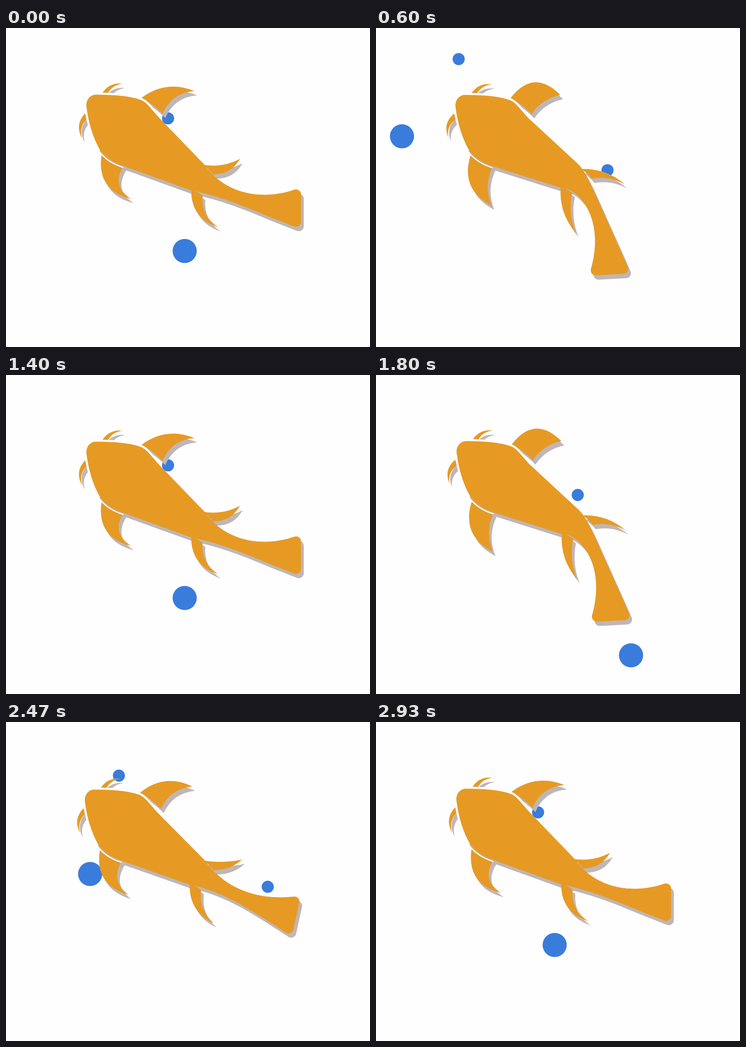
Animation, 799 px wide and 701 px high, one loop 2.99 s. Source, as an HTML page with a canvas:

```html
<!DOCTYPE html>
<html lang="en">
<head>
<meta charset="utf-8">
<title>Swimming fish</title>
<style>
  html, body { margin: 0; width: 100%; height: 100%; overflow: hidden; background: #fefefe; }
  canvas { display: block; }
</style>
</head>
<body>
<canvas id="stage" width="799" height="701"></canvas>
<script>
const ctx = document.getElementById('stage').getContext('2d');
const ORANGE = '#e69a24', SHADOW = '#bfb6b6', BLUE = '#397cdc', PAPER = '#fefefe';
const LOOP = 2990, FRAME = 200 / 3, CYCLE = 1500;

// Swim clock: time and phase, linear in between.
const CLOCK = [[0, 995], [600, 1695], [1800, 2895], [2467, 3500], [2930, 3995], [LOOP, 3995]];

const CHIN = 'M259 303Q224 292 207 268';
const HEAD = CHIN + 'Q184 228 177 172C176 158 184 147 197 146Q265 146 295 157C308 161 318 176 336 196';

// Each fin grows from a to b and sways between two tips.
// outer and inner give the bulge of its edges at either end of the sway.
const FRONT_FINS = [
  { a: [298, 153], b: [344, 188], tips: [[414, 138], [407, 146]], outer: [0.28, 0.57], inner: [0.3, 0.2] },
  { a: [210, 279], b: [259, 302], tips: [[275, 375], [256, 389]], outer: [-0.45, -0.42], inner: [-0.5, -0.22] },
  { a: [211, 144], b: [223, 145], tips: [[256, 122], [257, 123]], outer: [0.32, 0.32], inner: [0.27, 0.27] },
  { a: [174, 187], b: [177, 200], tips: [[168, 243], [161, 239]], outer: [-0.37, -0.37], inner: [-0.3, -0.3] }
];
const REAR_FINS = [
  { a: [432, 300], b: [455, 321], tips: [[514, 287], [549, 343]], outer: [-0.17, 0.2], inner: [-0.3, 0.18], slide: [21, 9] },
  { a: [407, 354], b: [432, 368], tips: [[466, 437], [441, 449]], outer: [-0.37, -0.21], inner: [-0.3, -0.15], slide: [1, -7] }
];

const mix = (a, b, k) => a + (b - a) * k;
const mid = (p, q) => [(p[0] + q[0]) / 2, (p[1] + q[1]) / 2];
const wave = (p, peak) => Math.cos(2 * Math.PI * (p - peak) / CYCLE);

// Control point for an edge that bulges sideways by a share of its length.
function bulge(p, q, size) {
  const [x, y] = mid(p, q);
  return [x + (q[1] - p[1]) * size, y - (q[0] - p[0]) * size];
}

function fin({ a, b, tips, outer, inner, slide = [0, 0] }, k) {
  const move = p => p.map((v, i) => v + slide[i] * k);
  const from = move(a), to = move(b);
  const tip = tips[0].map((v, i) => mix(v, tips[1][i], k));
  const path = new Path2D();
  path.moveTo(...from);
  path.quadraticCurveTo(...bulge(from, tip, mix(...outer, k)), ...tip);
  path.quadraticCurveTo(...bulge(to, tip, mix(...inner, k)), ...to);
  path.quadraticCurveTo(...bulge(to, from, -0.08), ...from);
  return path;
}

// The tail follows a bending spine; its width narrows at the waist and flares at the end.
function body(k, bend) {
  const path = new Path2D(HEAD), steps = 40, length = 241;
  const back = [], belly = [];
  let x = 420 + 8 * k, y = 328 - 4 * k;
  for (let i = 0; i <= steps; i++) {
    const s = i / steps;
    const turn = (32 * (1 - s) + 87 * bend * s ** 0.65) * Math.PI / 180;
    const half = 32 * (1 - s) ** 3 + 46 * s * s;
    const dx = Math.cos(turn), dy = Math.sin(turn);
    back.push([x + dy * half, y - dx * half]);
    belly.unshift([x - dy * half, y + dx * half]);
    x += dx * length / steps;
    y += dy * length / steps;
  }
  const top = back.pop(), bottom = belly.shift();
  back.slice(0, -1).forEach(p => path.lineTo(...p));
  path.arcTo(...top, ...bottom, 11);
  path.arcTo(...bottom, ...belly[1], 11);
  belly.slice(1).forEach(p => path.lineTo(...p));
  path.closePath();
  return path;
}

function phaseAt(t) {
  const i = Math.max(1, CLOCK.findIndex(c => c[0] >= t));
  const [t0, p0] = CLOCK[i - 1], [t1, p1] = CLOCK[i];
  return mix(p0, p1, (t - t0) / (t1 - t0)) % CYCLE;
}

function dot(x, y, r) {
  ctx.beginPath();
  ctx.arc(x, y, r, 0, 2 * Math.PI);
  ctx.fill();
}

function bubbles(p) {
  ctx.fillStyle = BLUE;
  for (const n of [-1, 0, 1]) {
    const age = p + n * CYCLE;
    dot(-24.7 + age * 0.419, 176.5 + age * 0.315, 26.5);
    if (age > -60 && age < 2460) dot(139 + age * 0.2178, 36.5 + age * 0.1628, 13.3);
  }
}

function line(path, color, width) {
  ctx.strokeStyle = color;
  ctx.lineWidth = width;
  ctx.stroke(new Path2D(path));
}

function fish(p) {
  const k = (0.669 - wave(p, 795)) / 1.479;
  const bend = k * (1 + k) / 2;
  const front = FRONT_FINS.map(f => fin(f, bend));
  const rear = [...REAR_FINS.map(f => fin(f, k)), body(k, bend)];
  const fill = list => list.forEach(s => ctx.fill(s));

  ctx.translate(-1.7 - 2.2 * wave(p, 480), 0.9 + 1.7 * wave(p, 560));
  ctx.save();
  ctx.translate(6, 9.5);
  ctx.fillStyle = SHADOW;
  fill([...front, ...rear]);
  ctx.restore();

  ctx.fillStyle = ORANGE;
  fill(front);
  line(HEAD, PAPER, 9);
  line(CHIN, SHADOW, 4);
  fill(rear);
}

function draw(now) {
  const frame = Math.min(44, Math.floor((now % LOOP + 3.4) / FRAME));
  const p = phaseAt(frame * FRAME);
  ctx.fillStyle = PAPER;
  ctx.fillRect(0, 0, 799, 701);
  ctx.save();
  ctx.beginPath();
  ctx.rect(16, 18, 659, 627);
  ctx.clip();
  bubbles(p);
  fish(p);
  ctx.restore();
}

let start;
function tick(now) {
  start ??= now;
  draw(Math.max(0, now - start));
  requestAnimationFrame(tick);
}
draw(0);
requestAnimationFrame(tick);
</script>
</body>
</html>
```
